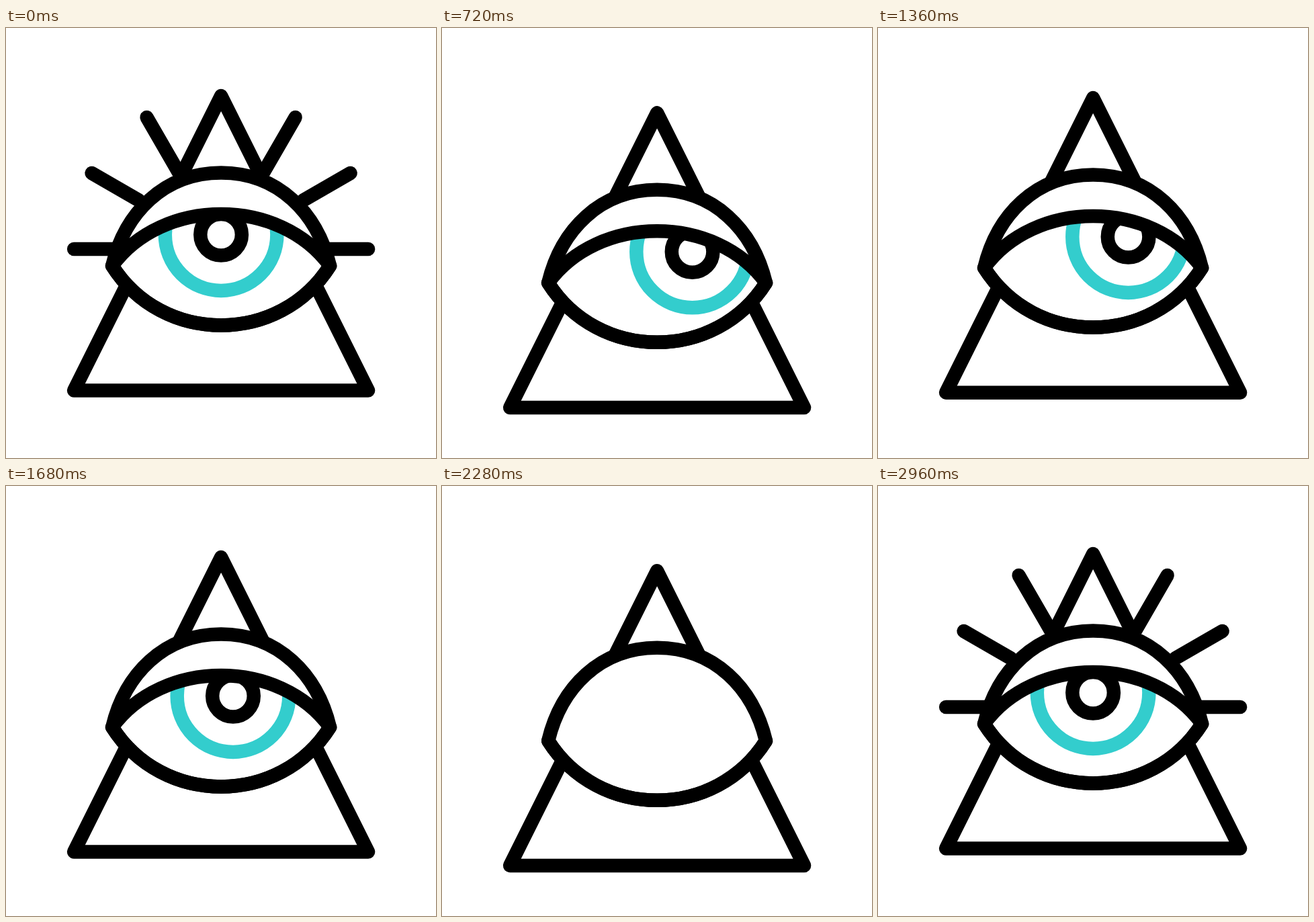
Write an HTML page with a canvas that moves like this. It is 640 px wide and 640 px high and loops after 3 s.

```html
<!DOCTYPE html>
<html lang="en">
<head>
<meta charset="utf-8">
<title>Eye pyramid</title>
<style>
  html, body { margin: 0; width: 100%; height: 100%; overflow: hidden; background: #fff; }
  canvas { display: block; width: 100vw; height: 100vh; }
</style>
</head>
<body>
<canvas></canvas>
<script>
const LOOP = 3000, DIP = 1300, DIP_START = 200;
const BLACK = '#000', TEAL = '#33cdcd';
const HALF = 162, CORNER = 354;              // eye half width, height of its corners
const LID_OPEN = 277, RIM = 442.5, BROW = 215.5;
const RAY_TIPS = [[219, 329], [192.5, 216], [110.5, 133]];

const canvas = document.querySelector('canvas');
const ctx = canvas.getContext('2d');
const scale = window.devicePixelRatio || 1;
canvas.width = canvas.height = 640 * scale;

// Sine ease from 0 to 1 between two times
function ease(t, from, to) {
  const x = Math.min(1, Math.max(0, (t - from) / (to - from)));
  return (1 - Math.cos(Math.PI * x)) / 2;
}

// Symmetric curve between the eye corners; dir 1 runs left to right
function arch(path, top, dir, lean = 125, flat = 63, lift = 0.66) {
  const shoulder = CORNER + lift * (top - CORNER);
  path.bezierCurveTo(-dir * lean, shoulder, -dir * flat, top, 0, top);
  path.bezierCurveTo(dir * flat, top, dir * lean, shoulder, dir * HALF, CORNER);
}

function startLeft() {
  const path = new Path2D();
  path.moveTo(-HALF, CORNER);
  return path;
}

function bodyShape() {
  const path = startLeft();
  arch(path, BROW, 1, 143, 85, 0.57);
  arch(path, RIM, -1);
  path.closePath();
  return path;
}

function eyeShape(lidY) {
  const path = startLeft();
  arch(path, lidY, 1);
  arch(path, RIM, -1);
  path.closePath();
  return path;
}

function ring(x, radius, color) {
  ctx.strokeStyle = color;
  ctx.beginPath();
  ctx.arc(x, 307.6, radius, 0, 2 * Math.PI);
  ctx.stroke();
}

// Rays leave outwards early in the loop and grow back from inside at its end
function drawRays(t) {
  const leaving = t < LOOP / 2;
  const from = leaving ? ease(t, 0, 480) : 0;
  const to = leaving ? 1 : ease(t, 2460, 2960);
  if (to - from < 0.001) return;

  RAY_TIPS.forEach(([x, y], i) => {
    const angle = i * Math.PI / 6, length = 64 + 17 * i;
    for (const side of [-1, 1]) {
      ctx.beginPath();
      for (const part of [from, to]) {
        const back = length * (1 - part);
        ctx.lineTo(side * (x - back * Math.cos(angle)), y + back * Math.sin(angle));
      }
      ctx.stroke();
    }
  });
}

function drawPyramid() {
  ctx.beginPath();
  ctx.moveTo(0, 101);
  ctx.lineTo(-219, 539.6);
  ctx.lineTo(219, 539.6);
  ctx.closePath();
  ctx.stroke();
}

function drawEye(gaze, shut) {
  const body = bodyShape();
  ctx.fillStyle = '#fff';
  ctx.fill(body);

  const eye = eyeShape(LID_OPEN + (RIM - LID_OPEN) * shut);
  ctx.save();
  ctx.clip(eye);
  ring(gaze, 83.3, TEAL);
  ring(gaze, 30.8, BLACK);
  ctx.restore();

  ctx.stroke(eye);
  ctx.stroke(body);
}

function draw(now) {
  const t = now % LOOP;
  const u = t - DIP_START;
  const moving = u > 0 && u < 2 * DIP;
  const dip = moving ? 28 * Math.sin(Math.PI * u / DIP) ** 2 : 0;
  const gaze = 52.5 * (ease(t, 200, 500) - ease(t, 1500, 1800));
  const v = moving ? u % DIP : 0;
  const shut = ease(v, 570, 770) - ease(v, 810, 1010);

  ctx.setTransform(scale, 0, 0, scale, 0, 0);
  ctx.clearRect(0, 0, 640, 640);
  ctx.translate(320.1, 0);
  ctx.lineWidth = 20.5;
  ctx.lineCap = ctx.lineJoin = 'round';
  ctx.strokeStyle = BLACK;

  drawRays(t);
  ctx.translate(0, dip);
  drawPyramid();
  drawEye(gaze, shut);
}

function frame() {
  draw(performance.now());
  requestAnimationFrame(frame);
}
frame();
</script>
</body>
</html>
```
